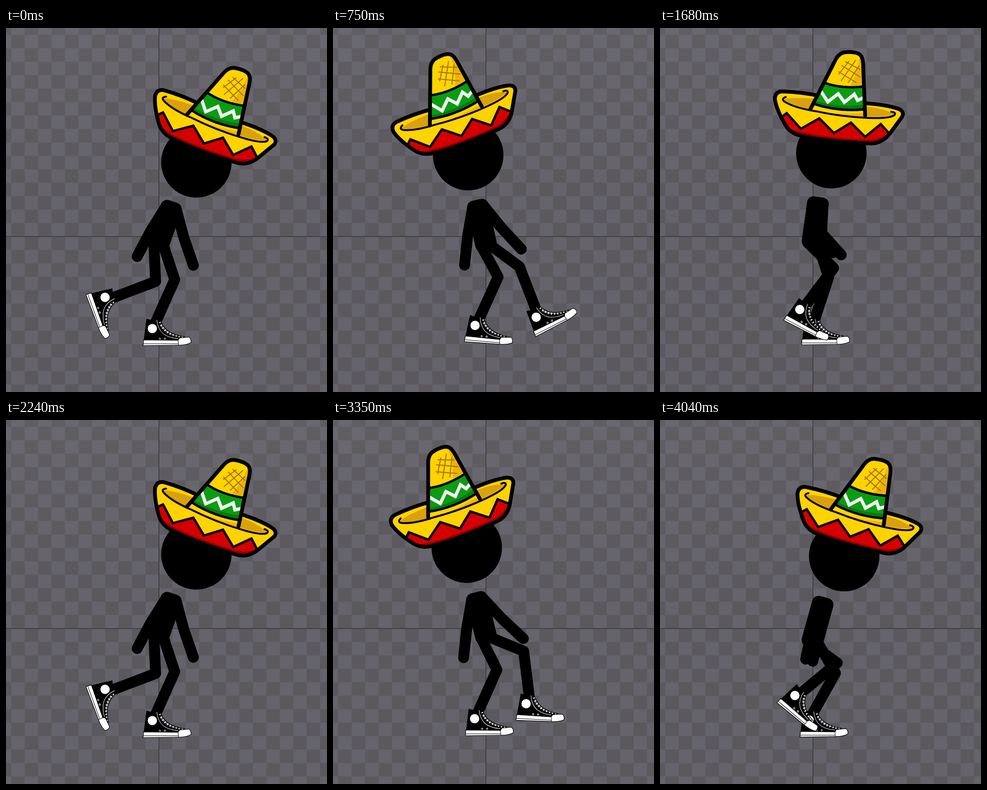
Write an HTML page that moves like this. It is 679 by 769 pixels and loops after 4.14 s.

```html
<!DOCTYPE html>
<html lang="en">
<head>
<meta charset="utf-8">
<title>Sombrero dance</title>
<style>
html, body { margin: 0; width: 100%; height: 100%; overflow: hidden; background: #605e64; }
svg { display: block; width: 100vw; height: 100vh; }
.limb { fill: none; stroke: #000; stroke-width: 23; stroke-linecap: round; stroke-linejoin: round; }
.ink { fill: none; stroke: #000; stroke-linejoin: round; stroke-linecap: round; }
</style>
</head>
<body>
<svg viewBox="0 0 679 769">
  <defs>
    <pattern id="checker" x="11.1" y="14.5" width="56.8" height="56.8" patternUnits="userSpaceOnUse">
      <rect width="56.8" height="56.8" fill="#65636b"/>
      <path d="M0 0h28.4v56.8h28.4v-28.4h-56.8z" fill="#5b595d"/>
    </pattern>
    <linearGradient id="glow" x2="0" y2="1">
      <stop stop-color="#fff" stop-opacity=".03"/>
      <stop offset=".45" stop-color="#fff" stop-opacity="0"/>
    </linearGradient>
    <clipPath id="crownShape">
      <path d="M318 172L372 66Q380 51 395 51Q420 50 426 60Q430 66 430 85L434 187Q370 186 318 172Z"/>
    </clipPath>
    <g id="shoe">
      <path d="M297 615L304 617L321 618Q325 634 340 644Q354 653 384 655L380 664L291 664Z"/>
      <path d="M319 618Q321 638 334 648Q346 656 364 657" fill="none" stroke="#fff"/>
      <path d="M326 622Q330 636 344 645Q358 652 378 654" fill="none" stroke="#fff" stroke-width="5" stroke-dasharray="2 4.6"/>
      <path class="ink" d="M328 622Q333 635 346 643Q360 651 378 653" stroke-width="1.5"/>
      <circle cx="309.5" cy="636" r="9.8" fill="#fff"/>
      <g stroke="#fff"><circle cx="325.5" cy="657.5" r="1.6"/><circle cx="336" cy="657.5" r="1.6"/></g>
      <path d="M291 660L364 661L367 656L387 654Q393 658 391 666Q380 671 365 671L290 672Z" fill="#fff" stroke="#000" stroke-width="1.2"/>
      <path class="ink" d="M291 668L364 668M364 661L365 671"/>
    </g>
  </defs>

  <rect width="679" height="769" fill="url(#checker)"/>
  <rect width="679" height="769" fill="url(#glow)"/>
  <path d="M323.500 0V769M0 440.500H679" stroke="#252427"/>

  <path id="farLeg" class="limb"/>
  <use id="farShoe" href="#shoe"/>
  <path id="nearLeg" class="limb"/>
  <use id="nearShoe" href="#shoe"/>
  <rect id="torso" x="-23" y="-93" width="46" height="110" rx="14"/>
  <path id="leftArm" class="limb"/>
  <path id="rightArm" class="limb"/>

  <g id="head">
    <circle cx="362.500" cy="264.500" r="74.500"/>
    <!-- brim -->
    <path d="M243 150Q243 135 258 134Q300 135 340 144L434 159Q480 162 505 171Q518 177 512 188L484 226Q468 244 447 244Q350 240 295 227Q275 221 266 206Q246 172 243 150Z" fill="#ffd300"/>
    <path d="M262 152Q270 145 332 150L318 172Q282 165 262 152ZM433 166Q475 169 496 183Q470 189 434 187Z" fill="#d9a10e"/>
    <path d="M256 189L268 180L298 213L337 191L368 222L404 200L434 230L467 203L484 222Q468 243 447 243Q350 240 295 227Q275 221 266 206Z" fill="#d40000"/>
    <path d="M264 203Q273 214 297 219Q350 232 440 236Q464 236 484 222Q468 243 447 243Q350 240 295 227Q272 220 264 203Z" fill="#980000"/>
    <path d="M256 189L268 180L298 213L337 191L368 222L404 200L434 230L467 203L484 222" fill="none" stroke="#000" stroke-width="5"/>
    <path class="ink" stroke-width="8" d="M340 144Q300 135 258 134Q243 135 243 150Q246 172 266 206Q275 221 295 227Q350 240 447 244Q468 244 484 226L512 188Q518 177 505 171Q480 162 434 159"/>
    <!-- crown -->
    <g clip-path="url(#crownShape)">
      <rect x="310" y="40" width="130" height="155" fill="#ffd300"/>
      <path d="M422 60Q418 98 402 123L440 126V50ZM320 176Q375 184 440 180V195H310Z" fill="#eab20b"/>
      <path d="M347 116Q385 129 440 123V171Q380 178 322 160Z" fill="#0b9c12"/>
      <path d="M322 152Q380 171 440 161V171Q380 178 322 162Z" fill="#087a0d"/>
      <path d="M338 130L355 156L377 139L390 157L411 140L418 153L431 147" fill="none" stroke="#f4f4f4" stroke-width="7"/>
      <path class="ink" stroke-width="5" d="M345 115Q385 130 436 123M324 160Q380 179 440 171"/>
    </g>
    <path d="M378 98L400 70M383 112L414 68M398 116L421 80M392 71L424 88M384 79L424 104M377 92L416 116" fill="none" stroke="#a8730c" stroke-width="2.2"/>
    <path class="ink" stroke-width="8" d="M318 172L372 66Q380 51 395 51Q420 50 426 60Q430 66 430 85L434 185"/>
    <path class="ink" stroke-width="4" d="M266 146Q255 150 264 156Q285 169 330 176Q385 188 440 190Q486 192 496 184Q500 178 489 177"/>
  </g>
</svg>
<script>
const LOOP = 4140, LAST = 4040, CYCLE = 2240, HOLD = 58;
const HIP_X = 323, TORSO = 93, THIGH = 76, SHIN = 100, ARM = 62;
const NECK = [336, 357], HEAD_TILT = 7.6, ANKLE = [316, 624];

// Pictures are held for about HOLD ms, counted anew from each of these times.
const RESTARTS = [0, 30, 570, 1100, 1680, 2240, 2770, 3350, 3920, LAST];

// Key poses: time, then the values at that time.
const bob = [[0, 454.5], [390, 437], [560, 449], [645, 463], [690, 464], [750, 454]]; // hip height
const sway = [[0, 19.5, 22], [645, -7, -15.6], [750, -12.2, -19], [930, -18, -23.5],
  [1112, -13.5, -19.3], [1680, 8, 7.6], [1800, 15.6, 17.2], [2050, 28, 30]]; // torso, head
const farFoot = [[0, 316, 623, 0], [645, 338, 619, 2], [748, 431, 597, -27],
  [920, 492, 532, -42], [1112, 415, 588, 3], [1500, 332, 620, 0]]; // x, y, turn
const nearFoot = [[0, 223, 571, 70], [450, 299, 614, 14], [750, 308, 617, 5], [1112, 306, 619, 0],
  [1560, 306, 613, 5], [1680, 307, 587, 28], [1800, 298, 577, 40], [2045, 153, 512, 115]];
const arms = [[0, -32, 15, 4], [645, 5, 3, 3], [748, -10, 39, 4],
  [1112, -10, 43, 4], [1680, -1, -3, 45], [1800, -12, -15, 0]]; // left, right, elbow bend

const el = id => document.getElementById(id);
const rad = deg => deg * Math.PI / 180;
const reach = ([x, y], len, deg) => [x + len * Math.sin(rad(deg)), y + len * Math.cos(rad(deg))];
const line = points => 'M' + points.map(p => p.map(v => v.toFixed(2)).join(' ')).join('L');

// Periodic cubic easing through the keys, without overshoot.
function sample(keys, time, period = CYCLE) {
  const t = time % period, n = keys.length;
  const at = (i, c) => keys[(i + n) % n][c] + (c ? 0 : Math.floor(i / n) * period);
  const i = keys.findLastIndex(key => key[0] <= t);
  const slope = (j, c) => (at(j + 1, c) - at(j, c)) / (at(j + 1, 0) - at(j, 0));
  const tangent = (j, c) => {
    const a = slope(j - 1, c), b = slope(j, c);
    return a * b > 0 ? 2 * a * b / (a + b) : 0;
  };
  const span = at(i + 1, 0) - at(i, 0), s = (t - at(i, 0)) / span;
  const blend = s * s * (3 - 2 * s);
  return keys[0].slice(1).map((_, k) => {
    const c = k + 1;
    return at(i, c) + (at(i + 1, c) - at(i, c)) * blend +
      span * (tangent(i, c) * s * (1 - s) ** 2 - tangent(i + 1, c) * s * s * (1 - s));
  });
}

function heldTime(t) {
  if (t >= LAST) return LAST;
  const i = RESTARTS.findLastIndex(start => start <= t);
  const start = RESTARTS[i], span = RESTARTS[i + 1] - start;
  const count = Math.round(span / HOLD), step = span / count;
  return start + step * Math.min(count - 1, Math.floor((t - start) / step + 0.12));
}

function drawLeg(name, hip, [x, y, turn]) {
  const dx = x - hip[0], dy = y - hip[1];
  const d = Math.min(Math.hypot(dx, dy), THIGH + SHIN - 0.1);
  const bend = Math.acos((THIGH ** 2 + d * d - SHIN ** 2) / (2 * THIGH * d));
  const knee = reach(hip, THIGH, (Math.atan2(dx, dy) + bend) * 180 / Math.PI);
  el(name + 'Leg').setAttribute('d', line([hip, knee, [x, y]]));
  el(name + 'Shoe').setAttribute('transform',
    `translate(${x} ${y}) rotate(${turn}) translate(${-ANKLE[0]} ${-ANKLE[1]})`);
}

function drawArm(name, shoulder, angle, bend) {
  const elbow = reach(shoulder, ARM, angle);
  el(name + 'Arm').setAttribute('d', line([shoulder, elbow, reach(elbow, ARM, angle + bend)]));
}

function draw(t) {
  const [hipY] = sample(bob, t, CYCLE / 2);
  const [lean, tilt] = sample(sway, t);
  const [left, right, bend] = sample(arms, t);
  const hip = [HIP_X, hipY];
  const neck = reach(hip, -TORSO, -lean);
  const chest = reach(hip, 13 - TORSO, -lean);
  const shoulder = side => reach(chest, 11 * side, 90 - lean);

  drawLeg('far', [HIP_X + 10, hipY + 5], sample(farFoot, t));
  drawLeg('near', [HIP_X - 10, hipY + 5], sample(nearFoot, t));
  el('torso').setAttribute('transform', `translate(${hip}) rotate(${lean})`);
  drawArm('left', shoulder(-1), left, bend);
  drawArm('right', shoulder(1), right, bend);
  el('head').setAttribute('transform',
    `translate(${neck}) rotate(${tilt - HEAD_TILT}) translate(${-NECK[0]} ${-NECK[1]})`);
}

const begin = performance.now();
function tick() {
  draw(heldTime((performance.now() - begin) % LOOP));
  requestAnimationFrame(tick);
}
tick();
</script>
</body>
</html>
```
